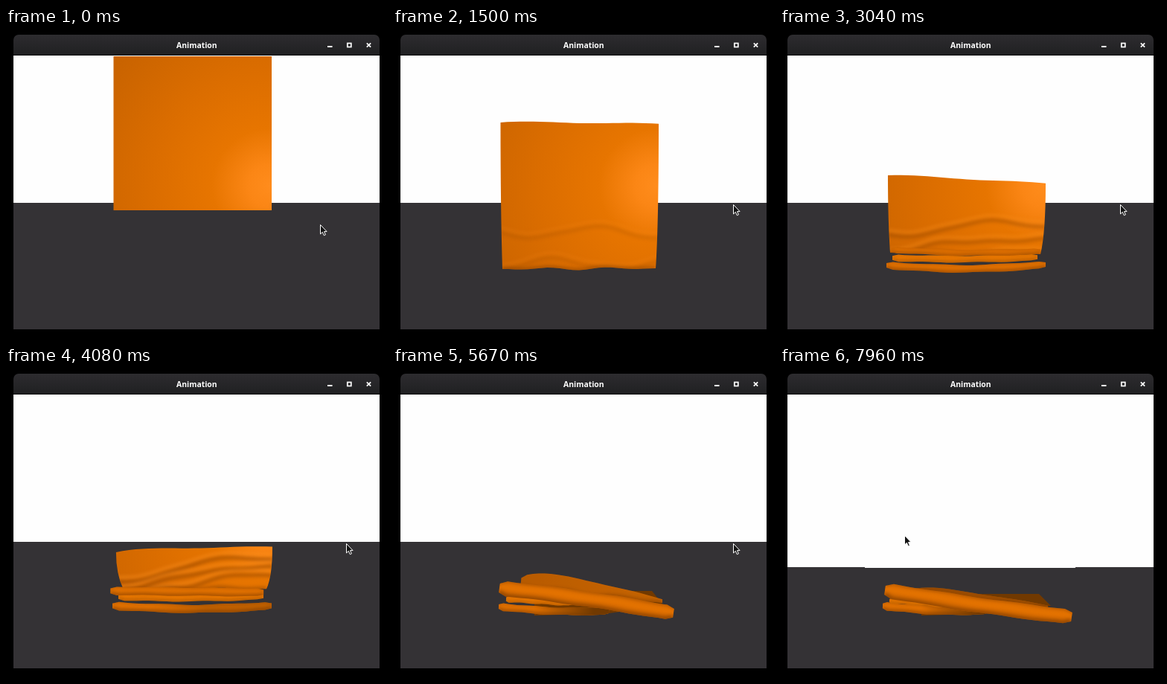
These frames come from a looping animation (512 by 418 pixels, 8000 ms). An HTML page with a canvas:

```html
<!DOCTYPE html>
<html lang="en">
<head>
<meta charset="utf-8">
<title>Animation</title>
<style>
  html, body { margin: 0; width: 100%; height: 100%; overflow: hidden; background: #000; }
  canvas { display: block; }
</style>
</head>
<body>
<canvas id="stage" width="512" height="418"></canvas>
<script>
const ctx = document.getElementById('stage').getContext('2d');
const LOOP = 8000, STEP = 1000 / 24;
const LAND = 1360, CRUMPLED = 4080, ROLLED = 5670, DRAG = 6980, END = 7960;

const clamp = v => Math.min(1, Math.max(0, v));
const ramp = (t, a, b) => clamp((t - a) / (b - a));
const smooth = u => u * u * (3 - 2 * u);
const mix = (a, b, u) => a + (b - a) * u;

// Values at time t, linear between the keyed states.
function stateAt(keys, t) {
  let i = 0;
  while (i < keys.length - 2 && t >= keys[i + 1].t) i++;
  const a = keys[i], b = keys[i + 1], u = ramp(t, a.t, b.t);
  const state = {};
  for (const k in a) state[k] = mix(a[k], b[k], u);
  return state;
}

// Sheet: top corners, bottom corners, and the rise of the top edge between them.
const corners = (t, ax, ay, bx, by, cx, cy, dx, dy, hump) =>
  ({ t, ax, ay, bx, by, cx, cy, dx, dy, hump });
const flat = (t, y) => corners(t, 144.5, y, 357, y, 144.5, y + 207, 357, y + 207, 0);
const sheetKeys = [
  flat(0, 38),
  flat(LAND, 118),
  corners(1500, 144.5, 127, 357, 129, 147, 324, 353, 323, 1),
  corners(3040, 145, 198, 357, 209, 148, 302, 350, 304, 1),
  corners(CRUMPLED, 148, 251, 358, 243, 158, 298, 350, 298, 3),
  corners(5200, 174, 281, 362, 310, 170, 295, 362, 314, 10),
  corners(DRAG, 168, 291, 362, 320, 170, 297, 362, 325, 16),
  corners(END, 175, 300, 360, 321, 178, 308, 360, 323, 7)
];

// Rolls: ends of the centre line, thickness and sag.
const tube = (t, x0, y0, x1, y1, size, sag) => ({ t, x0, y0, x1, y1, size, sag });
const foldKeys = [
  tube(3040, 149, 298, 350, 300, 8, 3),
  tube(CRUMPLED, 140, 301, 346, 303, 11, 0),
  tube(ROLLED, 143, 297, 377, 331, 20, -2),
  tube(DRAG, 144, 299, 382, 341, 18, -2),
  tube(END, 141, 300, 392, 336, 20, 2)
];
const ledgeKeys = [
  tube(CRUMPLED, 151, 309, 346, 308, 9, 2),
  tube(ROLLED, 152, 312, 240, 317, 8, 0),
  tube(END, 147, 314, 230, 320, 7, 0)
];
const hemKeys = [
  tube(1500, 150, 317, 352, 317, 9, 2),
  tube(3040, 143, 319, 357, 318, 10, 5),
  tube(CRUMPLED, 143, 321, 357, 321, 11, 4),
  tube(ROLLED, 142, 322, 290, 328, 10, 3),
  tube(END, 138, 321, 280, 327, 11, 3)
];

function sample(fn, n = 24) {
  return Array.from({ length: n + 1 }, (_, i) => fn(i / n));
}

function trace(pts) {
  pts.forEach(p => ctx.lineTo(...p));
}

function softLine(pts, color, width, alpha, blur = 2) {
  if (alpha <= 0) return;
  ctx.save();
  ctx.filter = `blur(${blur}px)`;
  ctx.globalAlpha *= alpha;
  ctx.strokeStyle = color;
  ctx.lineWidth = width;
  ctx.beginPath();
  trace(pts);
  ctx.stroke();
  ctx.restore();
}

function light() {
  const g = ctx.createRadialGradient(354, 212, 0, 354, 212, 285);
  g.addColorStop(0, '#ff8c1c');
  g.addColorStop(0.1, '#fb8615');
  g.addColorStop(0.27, '#e77500');
  g.addColorStop(0.55, '#db6d00');
  g.addColorStop(1, '#c56100');
  return g;
}

// A cylinder of cloth with cut-off end corners, lit from above.
function drawTube(s, fill, shade, decorate) {
  const angle = Math.atan2(s.y1 - s.y0, s.x1 - s.x0);
  const nx = -Math.sin(angle), ny = Math.cos(angle);
  const line = side => sample(u => {
    const end = Math.min(1, Math.min(u, 1 - u) * 24);
    const r = s.size / 2 * side * mix(.6, 1, end) + end * Math.sin(u * 17 + side) * .5;
    return [mix(s.x0, s.x1, u) + nx * r,
      mix(s.y0, s.y1, u) + s.sag * Math.sin(Math.PI * u) + ny * r];
  });
  const top = line(-1), bottom = line(1);
  ctx.save();
  ctx.beginPath();
  trace(top);
  trace(bottom.slice().reverse());
  ctx.closePath();
  ctx.fillStyle = fill;
  ctx.fill();
  ctx.clip();
  softLine(top, '#8f4600', s.size * .2, shade * .6, 1.5);
  softLine(line(-.2), '#ea7700', s.size * .35, shade);
  softLine(bottom, '#6b3200', s.size * .35, shade, 2.5);
  if (decorate) decorate();
  ctx.restore();
}

function drawSheet(t) {
  const s = stateAt(sheetKeys, t);
  const landed = ramp(t, LAND, 1500), crumple = ramp(t, 1500, CRUMPLED);
  const top = u => [mix(s.ax, s.bx, u),
    mix(s.ay, s.by, u) - s.hump * Math.sin(Math.PI * u ** .6) - landed * Math.sin(u * 9) * .8];
  const bottom = u => [mix(s.cx, s.dx, u),
    mix(s.cy, s.dy, u) + landed * Math.sin(Math.PI * u) * Math.sin(u * 16) * 2];
  const edge = sample(bottom);

  ctx.save();
  ctx.beginPath();
  trace(sample(top));
  ctx.quadraticCurveTo(s.bx, mix(s.by, s.dy, .7), s.dx, s.dy);
  trace(edge.slice().reverse());
  ctx.quadraticCurveTo(s.ax, mix(s.ay, s.cy, .6), s.ax, s.ay);
  ctx.closePath();
  ctx.fillStyle = light();
  ctx.fill();
  ctx.clip();
  ctx.fillStyle = `rgba(50,22,0,${.4 * ramp(t, 4600, 6900)})`;
  ctx.fillRect(130, 30, 260, 320);
  softLine(edge, '#6b3200', 6, .4 * landed);

  // Ridges start level near the hem and tilt up to the right as the cloth sinks.
  const strength = (.18 * landed + .32 * crumple) * (1 - ramp(t, 4400, 5400));
  for (let j = 0; j < 3; j++) {
    const ridge = shift => sample(u => {
      const v = .73 + j * .22 - .55 * crumple ** 2 * smooth(clamp(u * 1.3))
        + .04 * Math.sin(u * 8 + j * 2);
      return [top(u)[0], mix(top(u)[1], bottom(u)[1], v) + shift];
    });
    softLine(ridge(-2), '#ff9424', 5, strength * .8);
    softLine(ridge(4), '#8a4200', 5, strength);
  }
  ctx.restore();
}

function drawBack(t) {
  const spread = ramp(t, CRUMPLED, ROLLED), tilt = 4 * ramp(t, DRAG, END);
  ctx.fillStyle = '#713900';
  ctx.beginPath();
  trace([[190, 312 + tilt], [270, 301 + tilt], [mix(335, 348, spread), 301 + tilt],
    [mix(340, 364, spread), 321], [290, 331], [190, 334]]);
  ctx.fill();
}

// Shadow that deepens along the hem towards the right.
function hemShadow(t) {
  const g = ctx.createLinearGradient(190, 0, 270, 0);
  g.addColorStop(0, 'rgba(113,57,0,0)');
  g.addColorStop(1, '#713900');
  ctx.globalAlpha = ramp(t, 3400, 5500);
  ctx.fillStyle = g;
  ctx.fillRect(130, 300, 240, 40);
}

function cloth(t) {
  const swing = .025 * Math.sin(Math.PI * ramp(t, DRAG, END));
  ctx.save();
  ctx.transform(1, swing, 0, 1, 0, -140 * swing);
  if (t > CRUMPLED) drawBack(t);
  if (t > 1500) {
    drawTube(stateAt(hemKeys, t), '#d96c00', .7, () => hemShadow(t));
    ctx.globalAlpha = ramp(t, 1900, 2400);
    drawTube(stateAt(ledgeKeys, t), '#e87800', .6);
    ctx.globalAlpha = 1;
  }
  drawSheet(t);
  ctx.globalAlpha = ramp(t, 1900, 2900);
  drawTube(stateAt(foldKeys, t), '#d96c00', .65);
  ctx.restore();
}

function scene(t) {
  const horizon = Math.round(mix(235, 269, smooth(ramp(t, 7080, END))));
  ctx.fillStyle = '#343235';
  ctx.fillRect(10, 37, 492, 368);
  ctx.fillStyle = '#fefefe';
  ctx.fillRect(10, 37, 492, horizon - 37);
  if (horizon > 240) ctx.fillRect(114, horizon, 283, 1);
}

function titleBar() {
  const g = ctx.createLinearGradient(0, 9, 0, 36);
  g.addColorStop(0, '#2d2c2f');
  g.addColorStop(1, '#202022');
  ctx.fillStyle = g;
  ctx.beginPath();
  ctx.roundRect(10, 9, 492, 28, [7, 7, 0, 0]);
  ctx.fill();
  ctx.fillStyle = '#0c0c0d';
  ctx.fillRect(10, 36, 492, 1);
  ctx.fillStyle = ctx.strokeStyle = '#fff';
  ctx.font = 'bold 10.4px "Noto Sans", "Open Sans", sans-serif';
  ctx.textAlign = 'center';
  ctx.fillText('Animation', 256.3, 27);
  ctx.fillRect(432, 24, 6.5, 2);
  ctx.lineWidth = 1.7;
  ctx.strokeRect(458.8, 20.5, 5, 5);
  ctx.beginPath();
  ctx.moveTo(484.8, 20.3); ctx.lineTo(490.2, 25.7);
  ctx.moveTo(490.2, 20.3); ctx.lineTo(484.8, 25.7);
  ctx.stroke();
}

const arrow = new Path2D('M0 0V12.5L2.8 9.8 4.8 14.3 6.9 13.4 5 9.1H8.6Z');
function pointer(t) {
  const a = smooth(ramp(t, 80, 760)), b = smooth(ramp(t, 5900, 6640)), c = smooth(ramp(t, DRAG, 7900));
  ctx.save();
  ctx.translate(
    mix(mix(mix(422.5, 457.5, a), 129, b), 167.5, c),
    mix(mix(mix(264.5, 237.5, a), 246.5, b), 226.5, c));
  ctx.fillStyle = '#111';
  ctx.strokeStyle = '#fff';
  ctx.lineWidth = 1;
  ctx.fill(arrow);
  ctx.stroke(arrow);
  ctx.restore();
}

function draw(now) {
  const t = Math.floor((now % LOOP) / STEP + 0.05) * STEP;
  ctx.fillStyle = '#000';
  ctx.fillRect(0, 0, 512, 418);
  scene(t);
  cloth(t);
  titleBar();
  pointer(t);
}

const start = performance.now();
function tick() {
  draw(performance.now() - start);
  requestAnimationFrame(tick);
}
tick();
</script>
</body>
</html>
```
